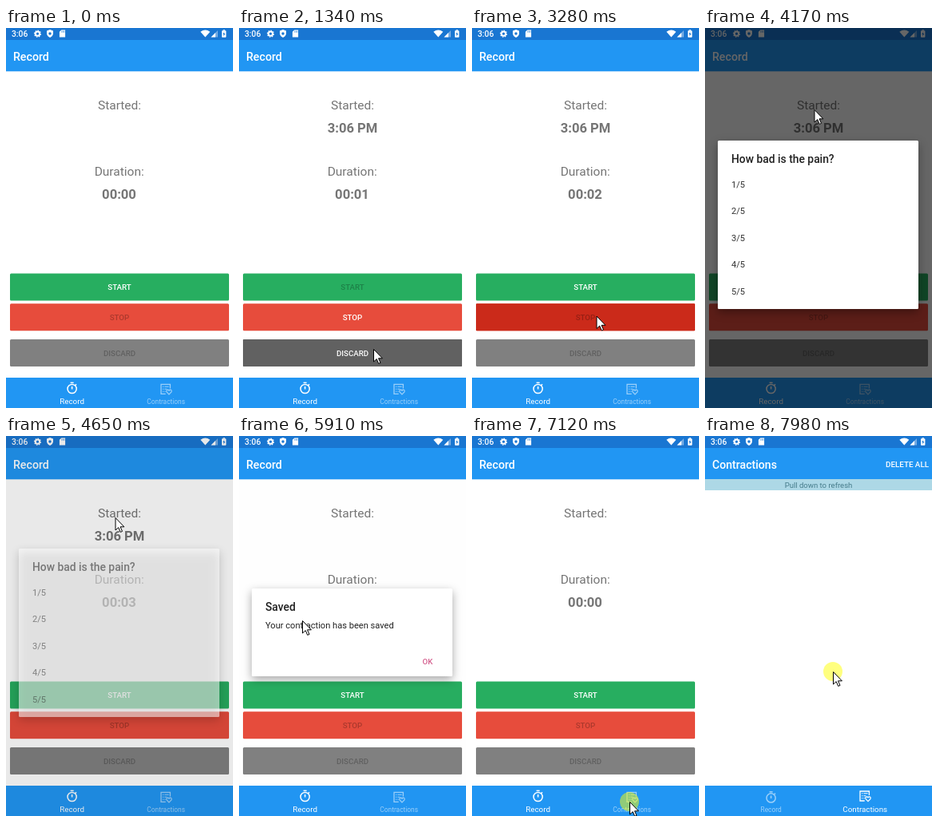
Write an HTML page with a canvas that moves like this. It is 284x476 px and loops after 8000 ms.

```html
<!DOCTYPE html>
<html lang="en">
<head>
<meta charset="utf-8">
<title>Contraction timer</title>
<style>
html, body { margin: 0; width: 100%; height: 100%; overflow: hidden; background: #fff; }
canvas { display: block; width: 284px; height: 476px; }
</style>
</head>
<body>
<canvas id="stage"></canvas>
<script>
const W = 284, H = 476, LOOP = 8000;
const BLUE = '#2196f3', GREY = '#757575', DISABLED = 'rgba(0,0,0,.26)';
const canvas = document.getElementById('stage');
const c = canvas.getContext('2d');
const ratio = window.devicePixelRatio || 1;
canvas.width = W * ratio;
canvas.height = H * ratio;

// pointer stops: time, x, y
const PATH = [
  [80, 240, 478], [290, 150, 324], [910, 150, 324], [1130, 168, 402],
  [1640, 168, 402], [1990, 150, 324], [2580, 150, 324], [2850, 155.5, 360.5],
  [3600, 155.5, 360.5], [4150, 136.5, 102], [4680, 136.5, 102], [4890, 53, 234],
  [5040, 53, 234], [5120, 53, 230], [5760, 53, 230], [5910, 79, 231],
  [6000, 107, 237], [6240, 240, 282], [6680, 240, 282], [7000, 197, 458],
  [7550, 197, 458], [7720, 160, 52], [7770, 160, 52], [7980, 160, 295]
];
const PRESSES = [
  [310, 470], [1140, 1300], [2010, 2170], [2870, 3000], [4180, 4340],
  [5150, 5330], [6270, 6460], [7020, 7160], [7740, 8000]
];
const CLOCK = [
  [0, '00:00'], [1000, '00:01'], [1480, '00:00'], [2600, '00:01'],
  [2960, '00:02'], [4400, '00:03'], [5620, '00:00']
];

const ramp = (t, a, b) => Math.min(1, Math.max(0, (t - a) / (b - a)));
const within = (t, a, b) => t >= a && t < b;
const smooth = u => u * u * (3 - 2 * u);
const easeOut = u => 1 - (1 - u) * (1 - u);

function rect(x, y, w, h, color) {
  c.fillStyle = color;
  c.fillRect(x, y, w, h);
}

function box(x, y, w, h, r, color) {
  c.fillStyle = color;
  c.beginPath();
  c.roundRect(x, y, w, h, r);
  c.fill();
}

function disc(x, y, r, color) {
  c.fillStyle = color;
  c.beginPath();
  c.arc(x, y, r, 0, 7);
  c.fill();
}

function shape(d, color, width) {
  const p = new Path2D(d);
  if (width) {
    c.strokeStyle = color;
    c.lineWidth = width;
    c.stroke(p);
  } else {
    c.fillStyle = color;
    c.fill(p);
  }
}

function text(s, x, y, size, color, weight = 400, align = 'left') {
  c.font = `${weight} ${size}px Roboto, sans-serif`;
  c.textAlign = align;
  c.fillStyle = color;
  c.fillText(s, x, y);
}

function at(x, y, draw) {
  c.save();
  c.translate(x, y);
  draw();
  c.restore();
}

function ripple(x, y, w, h, cx, cy, r, color, alpha = 1) {
  if (r <= 0 || alpha <= 0) return;
  c.save();
  c.globalAlpha *= alpha;
  c.beginPath();
  c.roundRect(x, y, w, h, 1);
  c.clip();
  disc(cx, cy, r, color);
  c.restore();
}

function statusBar() {
  rect(0, 0, W, 15, '#1976d2');
  text('3:06', 7, 11, 10.3, '#fff', 500);
  at(39.5, 7.2, () => {
    c.strokeStyle = '#fff';
    c.lineWidth = 2;
    c.beginPath();
    c.arc(0, 0, 2.6, 0, 7);
    c.stroke();
    c.lineWidth = 1.4;
    c.setLineDash([1.5, 1.5]);
    c.beginPath();
    c.arc(0, 0, 3.9, 0, 7);
    c.stroke();
  });
  at(55, 7, () => {
    shape('M0-5L4-3.4V0Q3.6 3.4 0 5Q-3.6 3.4-4 0V-3.4Z', '#fff');
    disc(0, 0, 1.7, '#1976d2');
  });
  at(70.5, 7, () => {
    shape('M-1.2-4.6H3.6V4.6H-3.6V-2.2Z', '#fff');
    for (const x of [-1, .7, 2.2]) rect(x, -3.4, .7, 2, '#1976d2');
  });
  shape('M243.3 4.8Q249.3 0 255.3 4.8L249.3 11.6Z', '#fff');
  shape('M256.5 11.5L265 3V11.5Z', 'rgba(255,255,255,.4)');
  shape('M256.5 11.5L262 6V11.5Z', '#fff');
  box(270, 3.2, 5.4, 8.6, .8, '#fff');
  rect(271.5, 2.2, 2.4, 1.2, '#fff');
  shape('M273.3 4.6L271.3 8H272.5L272.2 10.6L274.3 7H273Z', '#1976d2');
}

function button(label, y, color, enabled) {
  box(5, y, 274, 34, 1.5, color);
  return () => text(label, 142, y + 20.6, 9.7, enabled ? '#fff' : DISABLED, 500, 'center');
}

// grow from a press point, hold, then fade
function press(t, y, cx, cy, color, start, full, fade, end) {
  if (within(t, start, end))
    ripple(5, y, 274, 34, cx, cy, 170 * easeOut(ramp(t, start, full)), color, 1 - ramp(t, fade, end));
}

function recordPage(t) {
  const running = within(t, 470, 1480) || within(t, 2200, 3280);
  text('Record', 9, 41, 14.2, '#fff', 500);
  text('Started:', 142, 102, 15.5, GREY, 400, 'center');
  if (running || within(t, 3280, 5620)) text('3:06 PM', 142, 131, 16.6, GREY, 700, 'center');
  text('Duration:', 141.7, 185, 15.5, GREY, 400, 'center');
  const [, clock] = CLOCK.filter(k => k[0] <= t).pop();
  text(clock, 141.5, 214, 16.6, GREY, 700, 'center');

  const start = button('START', 307.5, '#27ae60', !running);
  press(t, 307.5, 150, 324, '#1e8449', 470, 600, 600, 720);
  press(t, 307.5, 150, 324, '#1e8449', 2160, 2290, 2290, 2440);
  start();
  const stop = button('STOP', 345.3, '#e74c3c', running);
  press(t, 345.3, 155, 361, '#cb2a1a', 2890, 3030, 3550, 3750);
  stop();
  const discard = button('DISCARD', 390, '#808080', running);
  press(t, 390, 168, 402, '#616161', 1190, 1330, 1500, 1700);
  discard();
}

function listPage() {
  text('Contractions', 9, 41, 14.1, '#fff', 500);
  text('DELETE ALL', 280, 39, 9.8, '#fff', 500, 'right');
  rect(0, 54, W, 14, '#add8e6');
  text('Pull down to refresh', 142, 65, 9.55, '#467c8b', 400, 'center');
}

function stopwatch(color) {
  shape('M5.6 1A5.6 5.6 0 1 1-5.6 1A5.6 5.6 0 1 1 5.6 1ZM0 1.6V-2M4.2-3.6L5.4-4.8', color, 1.5);
  rect(-2, -7.4, 4, 1.5, color);
}

function listHeart(color) {
  shape('M5.2-1V-6H-6.2V6H-.5', color, 1.3);
  shape('M-4.2-3.2H-2.9M-1.8-3.2H3.4M-4.2-.2H-2.9M-1.8-.2H1.2M-4.2 2.8H-2.9M-1.8 2.8H-.6', color, 1.1);
  shape('M3.8 6.6L.9 3.6Q0 1.2 2 .8Q3.2.7 3.8 1.8Q4.4.7 5.6.8Q7.6 1.2 6.7 3.6Z', color, 1.2);
}

function tab(label, x, icon, active) {
  const color = `rgba(255,255,255,${.55 + .45 * active})`;
  at(x, 452.4 - 1.4 * active, () => icon(color));
  text(label, x, 470.5, 8.4 + 1.4 * active, color, 400, 'center');
}

function dialog(y, h, title, alpha, body) {
  if (alpha <= 0) return;
  c.save();
  c.globalAlpha = alpha;
  c.shadowColor = 'rgba(0,0,0,.35)';
  c.shadowBlur = 12 * ratio;
  c.shadowOffsetY = 4 * ratio;
  box(16, y, 251, h, 1.5, '#fff');
  c.shadowColor = 'transparent';
  body();
  text(title, 33, y + 27.5, 13.85, '#212121', 500);
  c.restore();
}

function painDialog(t, alpha) {
  dialog(141, 211, 'How bad is the pain?', alpha, () => {
    if (t >= 5330) ripple(16, 212, 251, 34, 53, 230, 220 * ramp(t, 5310, 5420), '#dedede');
    for (let i = 0; i < 5; i++) text(`${i + 1}/5`, 33, 199.5 + 33.5 * i, 11.1, '#333');
  });
}

function savedDialog(t, alpha) {
  dialog(191, 110, 'Saved', alpha, () => {
    text('Your contraction has been saved', 33, 240.5, 11.1, '#212121');
    if (t >= 6460) ripple(216, 269, 40, 25, 240, 282, 24, '#dedede');
    text('OK', 236, 285.5, 9.7, t < 6460 ? '#d4608f' : '#ff4081', 500, 'center');
  });
}

function pointer(t) {
  let i = PATH.findIndex(k => k[0] > t);
  if (i === 0) return;
  if (i < 0) i = PATH.length - 1;
  const [t0, x0, y0] = PATH[i - 1], [t1, x1, y1] = PATH[i];
  const u = smooth(ramp(t, t0, t1));
  at(x0 + (x1 - x0) * u, y0 + (y1 - y0) * u, () => {
    if (PRESSES.some(([a, b]) => within(t, a, b))) disc(0, 0, 12, 'rgba(255,255,0,.5)');
    const arrow = 'M.5.5V16L4.2 12.6L6.7 18.4L9 17.4L6.5 11.8H11.4Z';
    shape(arrow, '#fff');
    shape(arrow, '#000', 1);
  });
}

function draw(t) {
  c.setTransform(ratio, 0, 0, ratio, 0, 0);
  rect(0, 0, W, H, '#fff');
  statusBar();
  rect(0, 15, W, 39.3, BLUE);
  if (t < 7160) recordPage(t); else listPage();
  rect(0, 438, W, 38, BLUE);
  const k = smooth(ramp(t, 7160, 7280));
  tab('Record', 82.6, stopwatch, 1 - k);
  tab('Contractions', 200.2, listHeart, k);

  const first = t < 4400 ? easeOut(ramp(t, 3550, 3700)) * (1 - ramp(t, 4340, 4400)) : 0;
  const second = t < 5620 ? easeOut(ramp(t, 4600, 4755)) : 0;
  const saved = easeOut(ramp(t, 5760, 5890)) * (1 - ramp(t, 6600, 6740));
  let dim = 0;
  if (t < 4400) dim = ramp(t, 3560, 3850) * (1 - ramp(t, 4340, 4400));
  else if (t < 5620) dim = ramp(t, 4610, 4900);
  else dim = ramp(t, 5910, 6130) * (1 - ramp(t, 6600, 6820));
  rect(0, 0, W, H, `rgba(0,0,0,${.6 * dim})`);

  painDialog(t, first + second);
  savedDialog(t, saved);
  pointer(t);
}

const begin = performance.now();
function frame() {
  draw((performance.now() - begin) % LOOP);
  requestAnimationFrame(frame);
}
frame();
</script>
</body>
</html>
```
